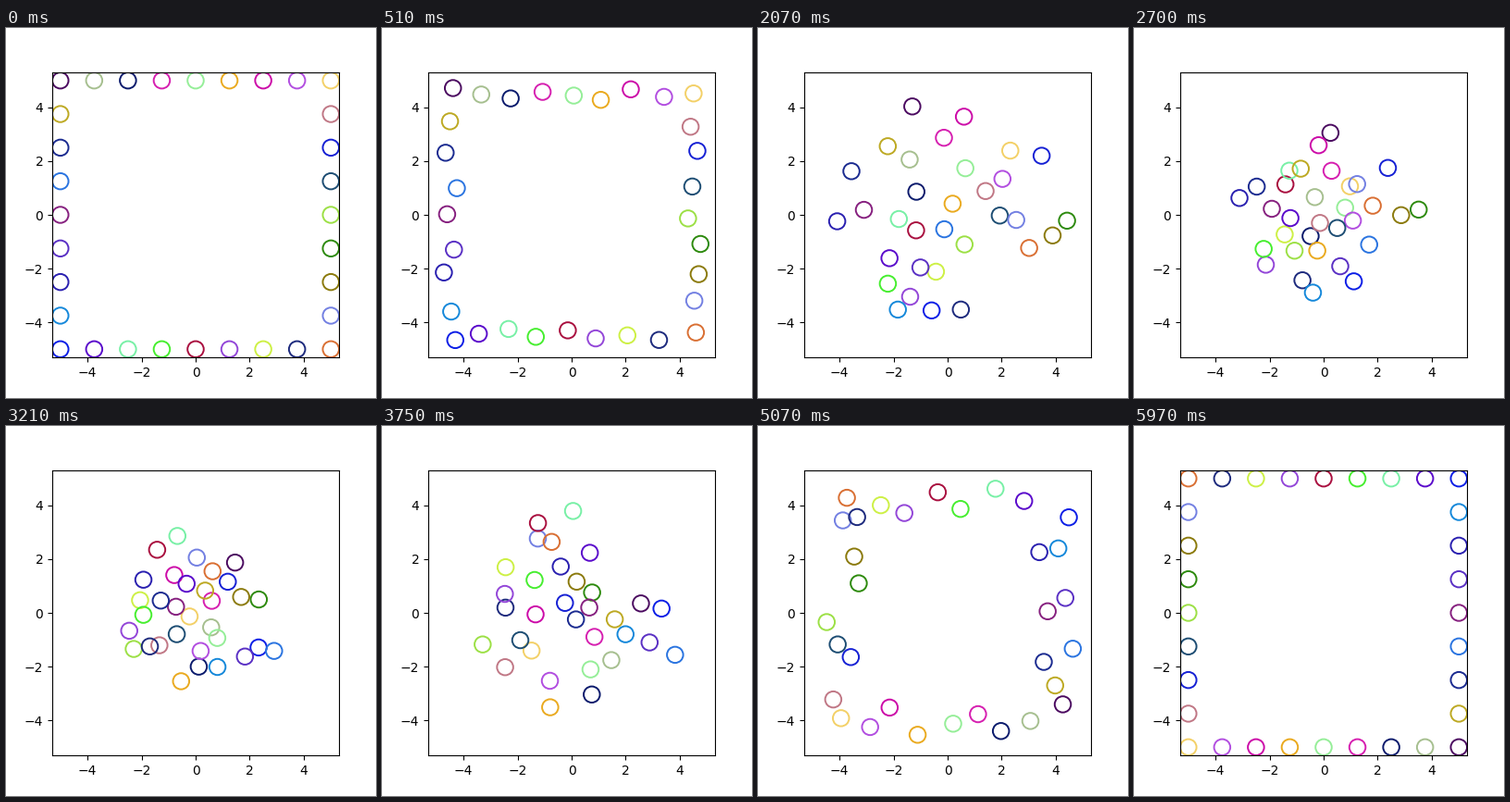
Recreate the animation shown at these times as a matplotlib script. Size 400x400 px, loop 6000 ms.

```python
import numpy as np
import matplotlib.pyplot as plt
from matplotlib.animation import FuncAnimation

FRAMES, INTERVAL = 200, 30
HALF, STEP, RADIUS = 5, 1.25, 0.3
LIMIT = HALF + RADIUS

# Clockwise from the top left corner: colour and detour around the crowd
AGENTS = [
    ("#4b0a60", 0.94, 2.43), ("#a6bf8f", 0.18, -0.01),
    ("#0a1a6c", -0.15, -1.49), ("#d61fb0", 0.47, 0.99),
    ("#95ee98", 0.81, -0.41), ("#eaaa1f", -0.41, -2.04),
    ("#cc0aa8", -0.53, 1.96), ("#b24ee0", 0.59, -0.90),
    ("#f3d067", 0.31, 0.40), ("#c07785", -0.82, -0.82),
    ("#1520d4", 1.74, 1.44), ("#1d4d73", -0.17, -0.67),
    ("#9ce045", -1.78, -1.36), ("#2d8a0d", 2.90, 0.37),
    ("#8b7a0c", 2.24, 0.33), ("#7380e2", 0.58, 1.68),
    ("#d96f33", 1.17, 1.03), ("#1d2a7d", -1.31, -1.80),
    ("#cdf045", -1.81, -0.06), ("#9346d8", -2.35, -1.21),
    ("#a90f3f", -1.44, 1.84), ("#46ee2f", -2.09, -0.61),
    ("#78f0a6", -0.95, 2.36), ("#5a0acb", -0.74, 0.56),
    ("#0b1ee6", 1.82, -1.84), ("#1588da", 0.28, -2.44),
    ("#2a20b0", -2.49, 0.98), ("#5a30c4", 1.31, -1.78),
    ("#86207f", -1.27, 0.23), ("#2a74e0", 2.40, -1.30),
    ("#1b2b90", -1.84, 0.73), ("#bda923", -0.18, 1.24),
]


def square_walk():
    """Points along the square's edge, clockwise from the top left."""
    pos, heading = np.array([-HALF, HALF]), np.array([STEP, 0])
    points = []
    for _ in range(4):
        for _ in range(len(AGENTS) // 4):
            points.append(pos)
            pos = pos + heading
        heading = np.array([heading[1], -heading[0]])
    return np.array(points)


def positions(i):
    """Eased crossing to the opposite point, bowed out by each detour."""
    s = i / (FRAMES - 1)
    crossing = 1 - 2 * s + 0.13 * np.sin(2 * np.pi * s)
    bump = abs(np.sin(np.pi * s)) ** 1.75
    return starts * crossing + detours * bump


starts = square_walk()
detours = np.array([agent[1:] for agent in AGENTS])

fig, ax = plt.subplots(figsize=(4, 4), dpi=100)
ax.set_xlim(-LIMIT, LIMIT)
ax.set_ylim(-LIMIT, LIMIT)
circles = [
    ax.add_patch(plt.Circle(start, RADIUS, fill=False, edgecolor=agent[0],
                            linewidth=1.4))
    for start, agent in zip(starts, AGENTS)
]


def update(i):
    for circle, center in zip(circles, positions(i)):
        circle.center = center
    return circles


anim = FuncAnimation(fig, update, frames=FRAMES, interval=INTERVAL,
                     repeat=True, repeat_delay=0)
plt.show()
```
